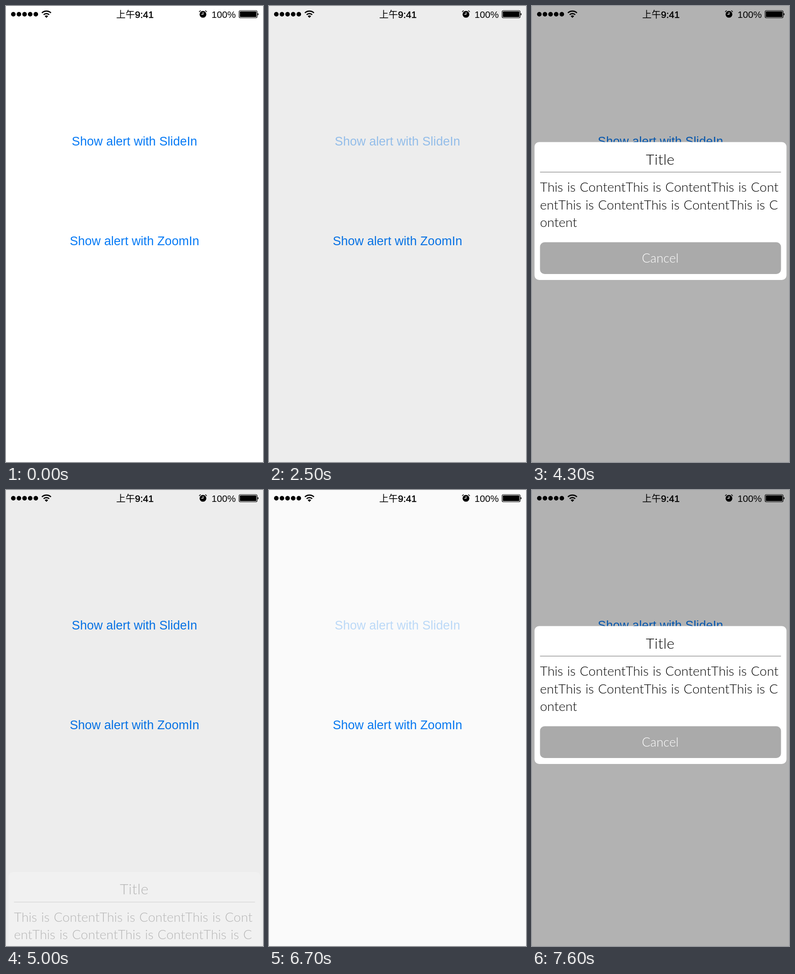
Recreate the animation shown at these times as an HTML page. Size 562x997 px, loop 8 s.

```html
<!DOCTYPE html>
<html lang="en">
<head>
<meta charset="utf-8">
<title>Alert slide-in</title>
<style>
  html, body { margin: 0; width: 100%; height: 100%; overflow: hidden; background: #fff; }
  svg { display: block; width: 562px; height: 997px; }
  text { text-anchor: middle; }
  .link { font: 27px "Liberation Sans", Arial, sans-serif; letter-spacing: .05px; fill: #067af5; }
  .alert text { font-family: Lato, sans-serif; font-weight: 300; fill: #000; font-kerning: none; }
  .alert .title { font-size: 32px; letter-spacing: .5px; }
  .alert .body { font-size: 28.3px; word-spacing: 1.5px; text-anchor: start; }
  .alert .cancel { font-size: 27.5px; fill: #fff; }
  .status text { font-family: "Liberation Sans", Arial, sans-serif; text-anchor: start; }
  .status .cjk { font: 500 20.5px "Noto Sans CJK SC", "Noto Sans CJK", sans-serif; }
  .status .time { font-size: 21px; stroke: #000; stroke-width: .5; }
  .status .level { font-size: 20.7px; }
</style>
</head>
<body>
<svg viewBox="0 0 562 997">
  <rect width="562" height="997" fill="#fff"/>
  <text id="slide" class="link" x="281" y="305">Show alert with SlideIn</text>
  <text class="link" x="281" y="523">Show alert with ZoomIn</text>
  <rect id="dim" width="562" height="997" opacity="0"/>

  <g id="alert" class="alert" opacity="0">
    <rect x="5.5" y="297.5" width="551" height="301.5" rx="10" fill="#fff"/>
    <text class="title" x="280.5" y="346.5">Title</text>
    <path d="M17.5 363.2H544.5" stroke="#999" stroke-width="1.5"/>
    <text class="body" x="17.5" y="406">This is ContentThis is ContentThis is Cont</text>
    <text class="body" x="17.5" y="444.5">entThis is ContentThis is ContentThis is C</text>
    <text class="body" x="17.5" y="482.5">ontent</text>
    <rect x="17.5" y="516.5" width="527" height="69.5" rx="10" fill="#aaa"/>
    <text class="cancel" x="280.5" y="561">Cancel</text>
  </g>

  <g class="status">
    <path d="M16 18h50" stroke="#000" stroke-width="10" stroke-linecap="round" stroke-dasharray="0 12.3"/>
    <g fill="none" stroke="#000" stroke-width="2.6">
      <path d="M78.5 15.2a14 14 0 0 1 19.8 0"/>
      <path d="M82.3 19.2a8.6 8.6 0 0 1 12.2 0"/>
    </g>
    <path d="M88.4 26l-3.8-4a5.4 5.4 0 0 1 7.6 0z"/>
    <text class="cjk" x="241" y="26">上午</text>
    <text class="time" x="282" y="26">9:41</text>
    <circle cx="430.7" cy="18.2" r="7.4"/>
    <path d="M422.4 13.2a9.7 9.7 0 0 1 3.4-3.4M435.6 9.8a9.7 9.7 0 0 1 3.4 3.4" fill="none" stroke="#000" stroke-width="1.5"/>
    <path d="M430.9 13.6v4.8h-3.8" fill="none" stroke="#fff" stroke-width="1.4"/>
    <text class="level" x="449.5" y="26">100%</text>
    <rect x="509.6" y="10" width="39.6" height="16" rx="3" fill="none" stroke="#000" stroke-width="1.2"/>
    <rect x="511.3" y="11.7" width="36.2" height="12.6" rx="1.6"/>
    <path d="M550.3 15.2q2 .6 2 2.8t-2 2.8z"/>
  </g>
</svg>
<script>
  const LOOP = 8000, STEP = 100, HEIGHT = 997, LAG = 30;
  const DIM_FADE = 300, ALERT_FADE = 350, EXIT = 450, EXIT_DROP = 700;
  const shows = [{ start: 2400, end: 4700 }, { start: 6647, end: Infinity }];
  const [slide, dim, alertBox] = ['slide', 'dim', 'alert'].map(id => document.getElementById(id));

  const clamp = v => Math.min(1, Math.max(0, v));

  // cubic-bezier(.42, 0, .58, 1), solved by bisection
  function ease(v) {
    const x = clamp(v);
    let lo = 0, hi = 1;
    for (let i = 0; i < 24; i++) {
      const s = (lo + hi) / 2, r = 1 - s;
      if (1.26 * r * r * s + 1.74 * r * s * s + s * s * s < x) lo = s; else hi = s;
    }
    return lo * lo * (3 - 2 * lo);
  }

  // Underdamped spring released at 1, settling at 0
  function spring(ms) {
    if (ms <= 0) return 1;
    const decay = .01375, freq = .01074;
    return Math.exp(-decay * ms) * (Math.cos(freq * ms) + decay / freq * Math.sin(freq * ms));
  }

  function pose(t) {
    const show = shows.find(s => t >= s.start && t < s.end + EXIT);
    if (!show) return { shade: 0, alpha: 0, y: -HEIGHT, press: 1 };
    const age = t - show.start;
    const out = ease((t - show.end) / EXIT);
    return {
      shade: .3 * ease(age / DIM_FADE) * (1 - out),
      alpha: ease(age / ALERT_FADE) * (1 - out),
      y: -HEIGHT * spring(age - LAG) + EXIT_DROP * out,
      press: .2 + .8 * ease(age / DIM_FADE)
    };
  }

  function draw(now) {
    // The screen refreshes ten times a second
    const t = Math.floor((now + 8) / STEP) * STEP % LOOP;
    const p = pose(t);
    dim.setAttribute('opacity', p.shade);
    slide.setAttribute('opacity', p.press);
    alertBox.setAttribute('opacity', p.alpha);
    alertBox.setAttribute('transform', `translate(0 ${p.y.toFixed(2)})`);
    requestAnimationFrame(draw);
  }
  draw(0);
</script>
</body>
</html>
```
